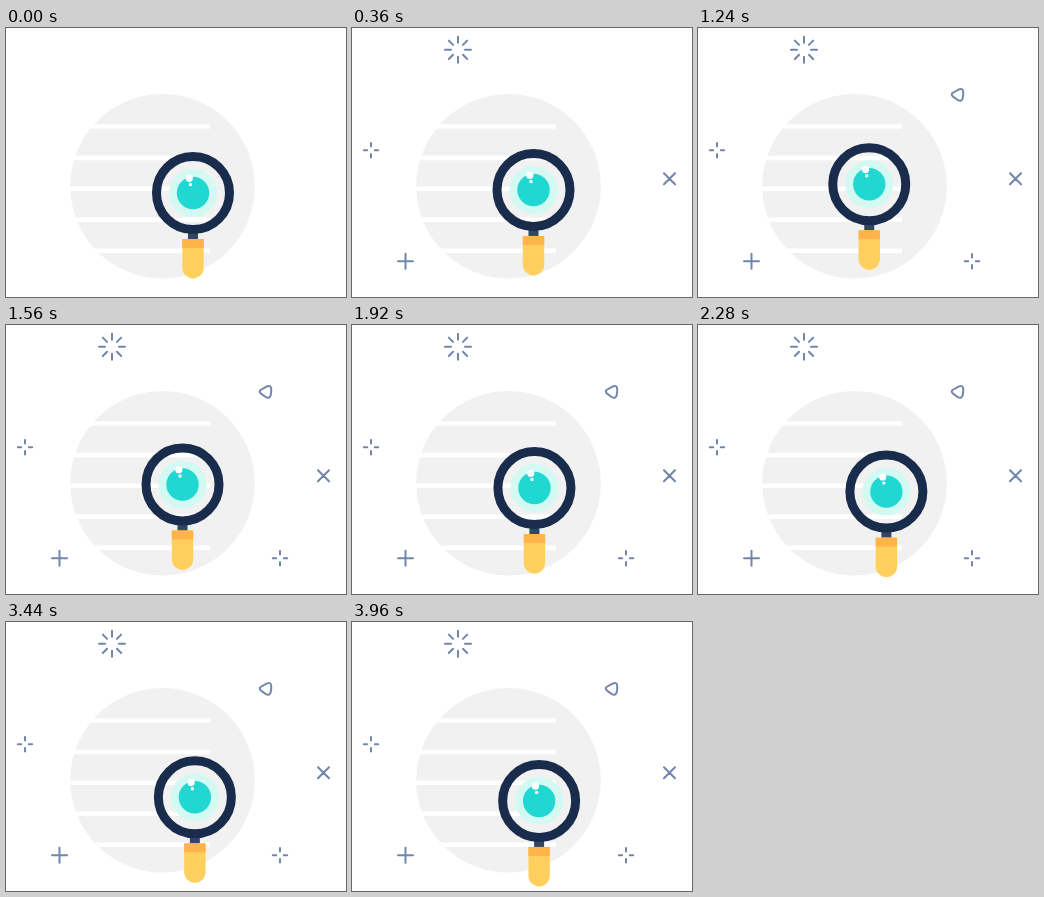
An HTML page that plays this animation: 340x269 px, repeating every 4000 ms.

```html
<!DOCTYPE html>
<html lang="en">
<head>
<meta charset="utf-8">
<title>Magnifying glass</title>
<style>
  html, body { margin: 0; width: 100%; height: 100%; overflow: hidden; background: #fff; }
  svg { display: block; width: 100%; height: 100%; }
  .spark { fill: none; stroke: #7186ab; stroke-width: 2; stroke-linecap: round; stroke-linejoin: round; }
</style>
</head>
<body>
<svg viewBox="0 0 340 269">
  <circle cx="156.5" cy="158.3" r="92.3" fill="#f1f1f1"/>
  <path d="M60 98.5H204M60 130H204M60 160.7H204M60 191.7H204M60 222.7H204" stroke="#fff" stroke-width="4.4"/>

  <g id="sparks"></g>

  <g id="glass">
    <circle r="24" fill="#d0fbf2" fill-opacity=".92"/>
    <circle r="16.2" fill="#20d8d1"/>
    <circle cx="-3.7" cy="-14.7" r="3.6" fill="#fff"/>
    <circle cx="-2.5" cy="-8.5" r="1.7" fill="#fff"/>
    <rect x="-5" y="38" width="10" height="9" fill="#344563"/>
    <circle r="36.5" fill="none" stroke="#1a2c4c" stroke-width="9"/>
    <path d="M-10.7 46H10.7V74.8A10.7 10.7 0 0 1-10.7 74.8Z" fill="#ffd05e"/>
    <path d="M-10.7 46H10.7V55H-10.7Z" fill="#ffb44b"/>
  </g>
</svg>
<script>
const LOOP = 4000, STEP = 40;

// Rays around a centre, each running from the inner to the outer radius
function rays(cx, cy, count, inner, outer, turn = 0) {
  let d = "";
  for (let i = 0; i < count; i++) {
    const a = turn + i * 2 * Math.PI / count;
    const point = r => `${cx + r * Math.cos(a)} ${cy + r * Math.sin(a)}`;
    d += `M${point(inner)}L${point(outer)}`;
  }
  return d;
}

// Each spark: the time it pops in, and its outline
const sparks = [
  [80, rays(53.5, 233.3, 4, 0, 7.5)],
  [160, rays(19, 122.3, 4, 3.8, 7.2)],
  [240, rays(106, 21.8, 8, 7, 13)],
  [320, rays(317.5, 150.8, 4, 0, 7.8, Math.PI / 4)],
  [400, "M254.5 65L261 61.4Q265 59.8 265.2 64Q265.5 67 264.7 70Q263.8 74.2 260 72.2L255 68.6Q252.7 66.6 254.5 65Z"],
  [480, rays(274, 233.3, 4, 3.8, 7.2)]
].map(([start, d]) => {
  const el = document.createElementNS("http://www.w3.org/2000/svg", "path");
  el.setAttribute("class", "spark");
  el.setAttribute("d", d);
  document.getElementById("sparks").append(el);
  return { start, el };
});

// Lens centre: time, x, y
const route = [
  [0, 187, 165],
  [1140, 169.6, 155.3],
  [2500, 192, 168.8],
  [4000, 187, 179.2]
];
const glass = document.getElementById("glass");

function draw(t) {
  const i = route.findIndex(stop => stop[0] > t);
  const [t0, x0, y0] = route[i - 1], [t1, x1, y1] = route[i];
  const k = (t - t0) / (t1 - t0);
  glass.setAttribute("transform", `translate(${x0 + (x1 - x0) * k} ${y0 + (y1 - y0) * k})`);
  for (const { start, el } of sparks) {
    el.setAttribute("visibility", t >= start ? "visible" : "hidden");
  }
}

let began;
function tick(now) {
  began ??= now;
  const t = Math.max(0, now - began) % LOOP;
  draw(Math.floor(t / STEP) * STEP);
  requestAnimationFrame(tick);
}
draw(0);
requestAnimationFrame(tick);
</script>
</body>
</html>
```
